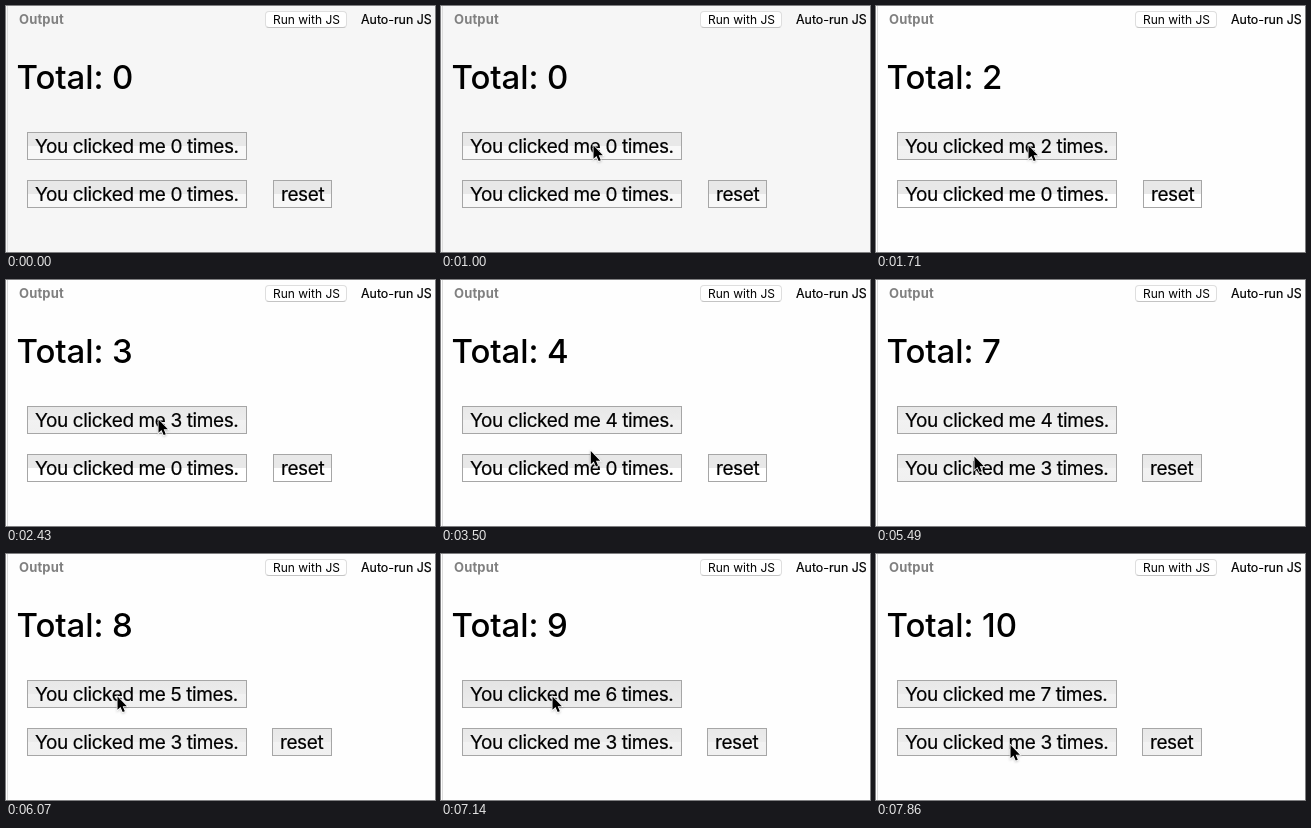
An HTML page that plays this animation: 429x246 px, repeating every 8 s.

```html
<!DOCTYPE html>
<html lang="en">
<head>
<meta charset="utf-8">
<title>Click counters</title>
<style>
  html, body { margin: 0; width: 100%; height: 100%; overflow: hidden; }
  body { position: relative; background: #f6f6f6; color: #000; font-family: Inter, Roboto, sans-serif; }
  body.bright { background: #fefefe; }
  body * { position: absolute; box-sizing: border-box; white-space: pre; }
  .edge { left: 1px; top: 0; width: 1px; height: 100%; background: #dcdcdc; }
  .bar { top: 3px; font-size: 12.4px; line-height: 20px; }
  .title { left: 13px; font-size: 13px; font-weight: 700; letter-spacing: .15px; color: #808080; }
  .run { left: 259px; top: 5px; width: 82px; height: 17px; padding-left: 7px; border: 1px solid #dedede;
    border-bottom-color: #c4c4c4; border-radius: 4px; background: #fff; font-size: 12px; line-height: 16px; }
  .auto { left: 355px; top: 4px; -webkit-text-stroke: .2px; }
  h1 { left: 10.5px; top: 51px; margin: 0; font-size: 33px; font-weight: 500; line-height: 40px; letter-spacing: -.08px; }
  .btn { left: 21px; width: 220px; height: 28px; padding-left: 7px; border: 1px solid #a6a6a6;
    background: linear-gradient(#e8e8e8 50%, #f8f8f8 50%); font-size: 19px; line-height: 28px;
    letter-spacing: -.4px; -webkit-text-stroke: .2px; }
  .bright .btn { background: linear-gradient(#e8e8e8 50%, #fff 50%); }
  .bright .btn.used { background: linear-gradient(#e8e8e8, #ececec 50%, #f2f2f2 50%, #f0f0f0); }
  .bright .btn.down { background: linear-gradient(#e4e4e4, #ececec); }
  #b0 { top: 126px; }
  #b1, #reset { top: 174px; }
  #reset { left: 267px; width: 59px; }
  #reset.used { left: 266px; width: 60px; }
  #cursor { left: 0; top: 0; overflow: visible; filter: drop-shadow(0 1px 1px rgba(0, 0, 0, .2)); }
</style>
</head>
<body>
<div class="edge"></div>
<span class="bar title">Output</span>
<span class="bar run">Run with JS</span>
<span class="bar auto">Auto-run JS</span>
<h1 id="total">Total: 0</h1>
<div class="btn" id="b0"></div>
<div class="btn" id="b1"></div>
<div class="btn" id="reset">reset</div>
<svg id="cursor" width="12" height="18">
  <path d="M0 0V13.3L3 10.5L5.2 15.6L7.3 14.7L5.2 9.8H9.4Z" stroke="#fff" stroke-width="1.5" paint-order="stroke"/>
</svg>
<script>
const LOOP = 8000;
const BRIGHT_AT = 1530;
const PRESS = 60; // how long a button is held, ms
const STEP = 55;  // time between cursor positions, ms

const $ = id => document.getElementById(id);
const buttons = [
  { el: $('b0'), clicks: [1620, 1710, 2430, 3200, 6070, 6720, 7200] },
  { el: $('b1'), clicks: [3890, 4530, 5250] }
];

// The cursor enters at the first point and eases on to each next one
const path = [
  { x: 175, y: 210 },
  { start: 500, end: 1000, x: 152.5, y: 139.5 },
  { start: 3380, end: 3770, x: 148, y: 191 },
  { start: 4070, end: 4230, x: 95, y: 185.5 },
  { start: 5490, end: 5950, x: 111.5, y: 142.5 },
  { start: 7500, end: 7860, x: 134.5, y: 191 }
];

const easeOut = p => 1 - (1 - p) ** 2;
const mix = (a, b, p) => a + (b - a) * p;

function cursorAt(t) {
  const i = path.findLastIndex(p => t >= p.start);
  if (i < 0) return null;
  const from = path[i - 1], to = path[i];
  const gaps = Math.round((to.end - to.start) / STEP);
  const step = Math.floor((t - to.start) / (to.end - to.start) * gaps + 1e-6) + 1;
  const p = easeOut(Math.min(1, step / (gaps + 1)));
  return { x: mix(from.x, to.x, p), y: mix(from.y, to.y, p) };
}

function render(t) {
  document.body.classList.toggle('bright', t >= BRIGHT_AT);

  let total = 0;
  for (const { el, clicks } of buttons) {
    const count = clicks.filter(c => t >= c).length;
    total += count;
    el.textContent = `You clicked me ${count} times.`;
    el.classList.toggle('used', count > 0);
    el.classList.toggle('down', clicks.some(c => t >= c - PRESS && t < c));
  }
  $('total').textContent = `Total: ${total}`;
  $('reset').classList.toggle('used', $('b1').classList.contains('used'));

  const pos = cursorAt(t);
  $('cursor').style.visibility = pos ? 'visible' : 'hidden';
  if (pos) $('cursor').style.transform = `translate(${pos.x}px, ${pos.y}px)`;
}

const began = performance.now();
function tick() {
  render((performance.now() - began) % LOOP);
  requestAnimationFrame(tick);
}
tick();
</script>
</body>
</html>
```
